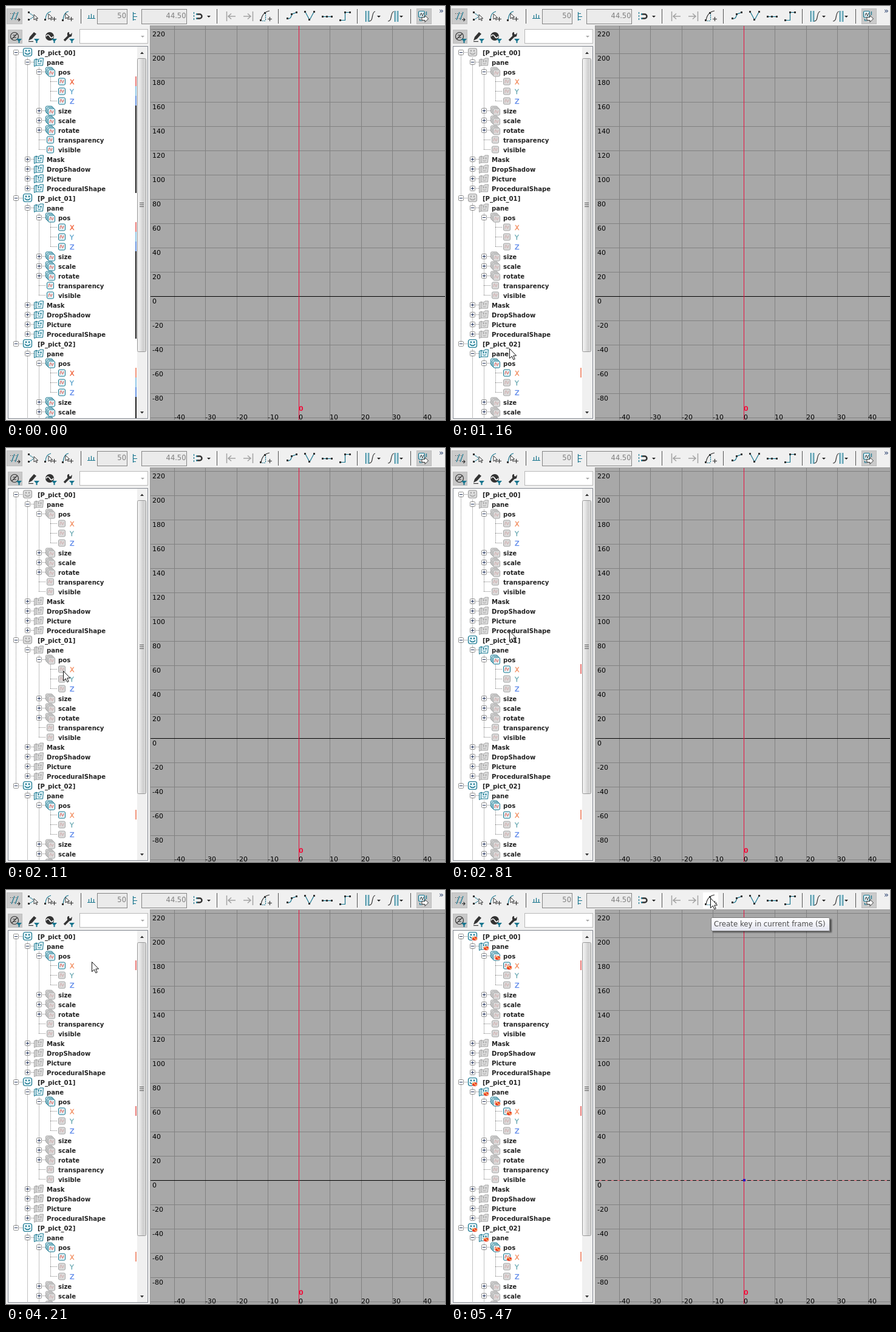
Animation of 723 by 682 pixels, one loop 6.32 s. Source, as an HTML page:

```html
<!DOCTYPE html>
<html lang="en">
<head>
<meta charset="utf-8">
<title>Curve editor</title>
<style>
html, body { margin: 0; width: 100%; height: 100%; overflow: hidden; background: #f0f0f0; }
svg { display: block; font-family: "DejaVu Sans", Verdana, sans-serif; font-size: 11px; }
path, line { fill: none; }
.tree text { font-size: 10.1px; font-weight: bold; fill: #222; }
.tree .X, .tree .Y, .tree .Z { font-size: 11px; font-weight: normal; stroke-width: .4px; }
.tree .X { fill: #f0643c; stroke: #f0643c; }
.tree .Y { fill: #5ca4cc; stroke: #5ca4cc; }
.tree .Z { fill: #5c88ea; stroke: #5c88ea; }
.picked .X { fill: #f28f62; stroke: #f28f62; }
.picked .Y { fill: #6caab4; stroke: #6caab4; }
.icon { --line: #15748c; --fill: #e4f4f9; --curve: #e0483c; stroke: var(--line); fill: var(--fill); }
.icon.off { --line: #a4a4a4; --fill: #dcdcdc; --curve: #cfa6a6; }
.icon .curve { stroke: var(--curve); }
.icon .eye { fill: var(--line); stroke: none; }
.dots { stroke: #858585; stroke-dasharray: 1 1; }
.box { fill: #fff; stroke: #919191; }
.sign { stroke: #22335c; }
.teal { stroke: #17758e; stroke-width: 1.2; }
.dark { stroke: #333; stroke-width: 1.2; }
.pale { stroke: #a2a2a2; stroke-width: 1.5; }
.num { font-size: 11.5px; fill: #808080; text-anchor: end; }
</style>
</head>
<body>
<svg id="stage" width="723" height="682" viewBox="0 0 723 682"></svg>
<script>
const LOOP = 6320, STEP = 78.15;
const stage = document.getElementById('stage');

const rect = (x, y, w, h, fill, more = '') => `<rect x="${x}" y="${y}" width="${w}" height="${h}" fill="${fill}" ${more}/>`;
const path = (d, cls = '', more = '') => `<path d="${d}" class="${cls}" ${more}/>`;
const shape = (d, fill, more = '') => `<path d="${d}" style="fill:${fill}" ${more}/>`;
const text = (x, y, s, more = '') => `<text x="${x}" y="${y}" ${more}>${s}</text>`;
const at = (x, y, s, more = '') => `<g transform="translate(${x} ${y})" ${more}>${s}</g>`;
const range = n => [...Array(n).keys()];

// ---- graph ----
function graph() {
  let s = rect(237, 33, 486, 649, '#a8a8a8') + path('M237.5 33V682M237 32.5H723', '', 'stroke="#989898"');
  let lines = '', labels = '';
  for (const i of range(17)) {
    const y = 38.5 + i * 40;
    lines += `M238 ${y}H723`;
    labels += text(241, y + 11.3, 220 - i * 20);
  }
  for (const i of range(9)) {
    const x = Math.round(277 + i * 51.25);
    lines += `M${x + .5} 33V682`;
    labels += text(x, 681, i * 10 - 40);
  }
  s += path(lines, '', 'stroke="#818181"') + path('M238 478.5H723', '', 'stroke="#000"');
  s += `<g id="curve">${path('M238 478.5H723', '', 'stroke="#e2606e"')}${path('M238 478.5H723', '', 'stroke="#000" stroke-dasharray="6 4"')}</g>`;
  s += path('M482.5 33V682', '', 'stroke="#e8123f"') + labels;
  s += rect(481, 476, 4, 4, '#2a18c8', 'id="key"');
  return s + text(482, 667, '0', 'fill="#f0103c" font-weight="bold"');
}

// ---- toolbar ----
const node = (x, y) => rect(x - 1, y - 1, 3, 3, '#333');
const plus = (x, y) => path(`M${x - 3} ${y}.5h7M${x}.5 ${y - 3}v7`, 'dark');
const caret = (x, y, fill = '#222') => shape(`M${x - 3} ${y}h6l-3 3z`, fill);
const pointer = (x, y) => shape(`M${x} ${y}v9l2.3-2 1.8 3.3 1.4-.8-1.8-3.1h3z`, '#fff', 'stroke="#333"');
const funnel = x => shape(`M${x} 54h9l-3.5 4v3h-2v-3z`, '#17758e');

function toolbar() {
  const pressed = 'stroke="#bdbdbd"';
  let s = rect(0, 0, 723, 32, '#f0f0f0');
  s += rect(1.5, 4.5, 25, 25, '#cacaca', pressed) + rect(676.5, 4.5, 24, 25, '#cacaca', pressed);
  s += rect(415, 4, 25, 26, '#fff', 'id="hover"');
  s += path([123, 347, 448, 578, 666].map(x => `M${x}.5 5V29`).join(''), '', 'stroke="#555"');

  s += path('M7 12.5h10M7 20.5h10', 'dark', 'stroke-dasharray="1 2"') + path('M9 23l5-13M15 23l5-13', 'teal') + path('M18 22.5h5M20.5 20l2.5 2.5-2.5 2.5', 'dark');
  s += path('M38 11l8 6-8 6', 'teal', 'stroke-dasharray="2 1"') + node(37, 10) + node(37, 22) + pointer(46, 14);
  s += path('M65 23Q65 11 74 9', 'teal') + node(64, 22) + pointer(70, 13) + plus(79, 21);
  s += path('M94 24Q95 10 103 9', 'teal') + node(93, 23) + pointer(98, 12) + plus(107, 21);

  s += path('M134 20.5h13M136.5 20v-5M140.5 20v-7M144.5 20v-5', 'teal');
  s += rect(150.5, 5.5, 49, 24, '#ebebeb', 'stroke="#848484"') + text(198, 20, '50', 'class="num"');
  s += path('M209.5 10v14M210 12.5h4M210 17.5h6M210 22.5h4', 'teal');
  s += rect(223.5, 5.5, 74, 24, '#ebebeb', 'stroke="#848484"') + text(296.5, 20, '44.50', 'class="num"');
  s += path('M309.5 10v14', 'teal', 'stroke-dasharray="3 2"');
  s += at(319, 17, path('M-4-3.5h4a3.5 3.5 0 0 1 0 7h-4', '', 'stroke="#333" stroke-width="2.5"') + path('M-6-3.5h2M-6 3.5h2', '', 'stroke="#17758e" stroke-width="2.5"')) + caret(334, 16);

  s += path('M363.5 9v16M366 17h12M371 12.5l-5 4.5 5 4.5', 'pale') + path('M406.5 9v16M391 17h12M398 12.5l5 4.5-5 4.5', 'pale');
  s += path('M420 24Q422 10 434 8', 'dark') + path('M419 24.5h9M427.5 12v12', 'teal', 'stroke-dasharray="2 1"') + node(419, 23) + node(426, 11) + plus(434, 21);

  s += path('M465 21c6 0 4-7 7-8s4-2 7-2', 'teal') + node(463, 20) + node(470, 13) + node(478, 10);
  s += path('M493 10l7 13 7-13', 'teal') + node(492, 9) + node(499, 22) + node(507, 9);
  s += path('M522 17.5h14', 'teal') + node(521, 17) + node(528, 17) + node(536, 17);
  s += path('M551 23.5h7.5v-13h8', 'teal') + node(550, 23) + node(558, 10) + node(566, 10);

  s += rect(592, 8, 5, 18, '#c0dce4') + path('M592.5 8v18M597.5 8v18', 'teal') + path('M598 25c8 0 3-15 10-16', 'dark') + caret(614, 16);
  s += path('M629 25c8 0 3-15 10-16', 'dark') + rect(640, 8, 5, 18, '#c0dce4') + path('M640.5 8v18M645.5 8v18', 'teal') + caret(651, 16);
  s += rect(679.5, 8.5, 10, 10, '#e4f4f9', 'rx="2" class="teal"') + path('M682 16q2-8 3-2t3-3', '', 'stroke="#333"') + path('M692.5 9v6M681.5 21v3h4', 'teal');
  s += shape('M685 18.5h5v-3l5.5 5.5-5.5 5.5v-3h-5z', '#fff', 'stroke="#333"');
  s += text(713, 12, '»', 'font-size="13" fill="#223a6a"');

  s += rect(3.5, 39.5, 23, 22, '#c8c8c8', pressed);
  s += `<circle cx="14" cy="50" r="6.5" fill="none" class="dark"/>` + path('M9.5 54.5l9-9M11 48h6M11 52h6', 'dark') + funnel(17);
  s += shape('M37 57l2-6 7-8 4 3-7 8z', '#333') + path('M37 58.5h8', 'dark') + funnel(46);
  s += `<circle cx="72" cy="50" r="7" fill="#333"/>` + path('M66 50q3-5 6 0t6 0', '', 'stroke="#fff" stroke-width="1.5"') + funnel(75);
  s += path('M96 57l8-8', '', 'stroke="#333" stroke-width="3.5"') + shape('M109 44l-3 3-2-1 0-3q-4 0-3 5t7 2z', '#333') + funnel(104);
  s += rect(121.5, 38.5, 112, 23, '#fff', 'stroke="#b8b8b8"') + caret(225, 49, '#a8a8a8');
  return s;
}

// ---- tree ----
const CURVE = 'M-3 2.5C-2.5-4-.8-4 0-.5S1.8 3.5 3-2.5';
const tile = (x, y) => `<rect x="${x}" y="${y}" width="11" height="11" rx="2"/>`;
const eyes = (a, b, y) => [a, b].map(x => `<rect class="eye" x="${x}" y="${y}" width="2" height="2.5"/>`).join('');
const ICONS = {
  root: '<rect x="-6.5" y="-7" width="14" height="13" rx="3" stroke-width="1.2"/>' + eyes(-3, 2, -4) + path('M-4 .5q4.5 5 9 0', '', 'stroke-width="1.4"'),
  pane: shape('M-7.5-4l4-1.5v10.5l-4 2z', 'var(--fill)') + shape('M-4.5-4.5h5l1.5-2h5.5l-1 12h-11z', 'var(--fill)') + eyes(-1.5, 2.5, -3) + path('M-2 1q3 3.5 6 0'),
  stack: tile(-7.5, -7.5) + tile(-5.5, -5.5) + tile(-3.5, -3.5) + at(2, 2, path(CURVE, 'curve')),
  leaf: tile(-5.5, -5.5) + path(CURVE, 'curve')
};
const BADGE = '<ellipse cx="4" cy="3.5" rx="4.5" ry="3.4" fill="#e63a22" stroke="#fff" stroke-width=".6"/>' + path('M0 3q2-4 4 0t4 0', '', 'stroke="#ffc070" stroke-width="1.4"');

// level, label, icon, sign
const ROWS = [
  [0, '', 'root', '-'], [1, 'pane', 'pane', '-'], [2, 'pos', 'stack', '-'],
  [3, 'X', 'leaf'], [3, 'Y', 'leaf'], [3, 'Z', 'leaf'],
  [2, 'size', 'stack', '+'], [2, 'scale', 'stack', '+'], [2, 'rotate', 'stack', '+'],
  [2, 'transparency', 'leaf'], [2, 'visible', 'leaf'],
  [1, 'Mask', 'pane', '+'], [1, 'DropShadow', 'pane', '+'], [1, 'Picture', 'pane', '+'], [1, 'ProceduralShape', 'pane', '+']
];
const TEXT_X = [52, 67, 86, 105];

function treeRow(k, i) {
  const [level, label, icon, sign] = ROWS[i];
  const y = 77 + 16 * (15 * k + i), x = 16 + 19 * level;
  let s = path(`M${x} ${y - .5}h12`, 'dots');
  if (i === 3) s += rect(103, y - 9, 12, 16, '#cce4f7', `id="press${k}"`);
  if (sign) {
    s += `<rect class="box" x="${x - 3.5}" y="${y - 4.5}" width="8" height="8" rx="1"/>`;
    s += path(`M${x - 2} ${y - .5}h5` + (sign === '+' ? `M${x + .5} ${y - 3}v5` : ''), 'sign');
  }
  s += at(x + 19, y - .5, ICONS[icon], `class="icon" data-k="${k}" data-i="${i}"`);
  if (i < 4) s += at(x + 19, y - .5, BADGE, 'class="badge"');
  return s + text(TEXT_X[level], y + 4, label || `[P_pict_0${k}]`, `class="${label}"`);
}

function tree() {
  let s = rect(0, 33, 237, 649, '#f0f0f0') + rect(3.5, 66.5, 230, 613, '#fff', 'stroke="#828790"');
  let body = path('M16.5 77V557', 'dots');
  for (const k of range(3)) {
    const y = 77 + 240 * k;
    body += path(`M35.5 ${y + 8}V${y + 224}M54.5 ${y + 24}V${y + 160}M73.5 ${y + 40}V${y + 80}`, 'dots');
    body += range(15).map(i => treeRow(k, i)).join('');
    body += rect(213, y + 39, 2, 16, k === 2 ? '#f0957c' : '#ea7c78', `id="bar${k}"`);
    body += `<g class="bars">${rect(213, y + 55, 2, 16, '#92c8e6')}${rect(213, y + 71, 2, 16, '#6a96e2')}${rect(213, y + 87, 2, 144, '#1c1c1c')}</g>`;
  }
  s += `<g class="tree" id="tree" clip-path="url(#view)">${body}</g>`;
  s += rect(216, 67, 17, 612, '#f0f0f0') + rect(216.5, 86.5, 14, 483, 'url(#thumb)', 'rx="2" stroke="#979797"');
  s += path('M220 324.5h7M220 327.5h7M220 330.5h7', '', 'stroke="#555"');
  return s + shape('M221 79h6l-3-3.5z', '#333') + shape('M221 668h6l-3 3.5z', '#333');
}

// ---- tooltip and cursor ----
const tooltip = `<g id="shade" clip-path="url(#rim)">${rect(431, 48, 196, 22, '#000', 'opacity=".5" filter="url(#soft)"')}</g>` +
  `<g id="tip">${rect(428.5, 45.5, 195, 22, 'url(#tipFill)', 'rx="2" stroke="#767676"')}${text(433, 60, 'Create key in current frame (S)', 'font-size="11.8" fill="#4c4c4c"')}</g>`;
const cursor = `<g id="cursor">${shape('M.5.5V16.5L4.3 13 6.8 18.6 9.2 17.6 6.8 12H11.6Z', '#fff', 'stroke="#111"')}</g>`;

const stops = list => list.map((c, i) => `<stop offset="${i / (list.length - 1)}" stop-color="${c}"/>`).join('');
stage.innerHTML = `<defs>
<linearGradient id="thumb">${stops(['#f6f6f6', '#e6e6e6', '#cfcfcf', '#dadada'])}</linearGradient>
<linearGradient id="tipFill" x2="0" y2="1">${stops(['#fff', '#e4e5f0'])}</linearGradient>
<filter id="soft"><feGaussianBlur stdDeviation="1.3"/></filter>
<clipPath id="view"><rect x="4" y="67" width="229" height="612"/></clipPath>
<clipPath id="rim"><path d="M624 40H635V80H420V68H624Z"/></clipPath>
</defs>` + rect(0, 0, 723, 682, '#f0f0f0') + graph() + tree() + toolbar() + tooltip + cursor;

// ---- motion ----
const get = id => document.getElementById(id);
const show = (el, on) => { el.style.display = on ? '' : 'none'; };
const icons = [...document.querySelectorAll('.icon')];
const badges = [...document.querySelectorAll('.badge')];
const bars = [...document.querySelectorAll('.bars')];

const PICK = [48, 31, 13];   // step at which each X row is selected
const PRESS = [46, 29, 99];
const KEYED = 70, TIP = 66;
// step, x, y of the cursor tip
const TRACK = [
  [1, 478, 666], [2, 350, 645], [3, 240, 628], [4, 160, 613], [5, 115, 605], [6, 99, 603],
  [9, 99, 603], [10, 95, 603], [11, 93, 603], [13, 93, 603], [16, 98, 545], [20, 97, 424], [21, 94, 416],
  [24, 94, 385], [27, 94, 367], [35, 94, 367], [36, 96, 301], [38, 88, 210], [40, 82, 150], [42, 91, 126],
  [53, 91, 126], [54, 141, 118], [57, 290, 75], [59, 375, 42], [61, 420, 25], [62, 425, 16], [63, 427, 13]
];

function tipAt(n) {
  const j = TRACK.findIndex(p => p[0] >= n);
  if (j < 0) return TRACK[TRACK.length - 1].slice(1);
  if (j === 0) return TRACK[0].slice(1);
  const [a, ax, ay] = TRACK[j - 1], [b, bx, by] = TRACK[j];
  const u = (n - a) / (b - a);
  return [Math.round(ax + (bx - ax) * u), Math.round(ay + (by - ay) * u)];
}

function draw(time) {
  const n = Math.floor((time % LOOP + 13) / STEP);
  const picked = n >= PICK[2];
  const [x, y] = tipAt(n);
  show(get('cursor'), n > 0);
  get('cursor').setAttribute('transform', `translate(${x} ${y})`);
  get('tree').classList.toggle('picked', picked);
  for (const el of icons) {
    const { k, i } = el.dataset;
    el.classList.toggle('off', picked && !(i < 4 && n >= PICK[k]));
  }
  for (const k of range(3)) {
    show(get('bar' + k), !picked || n >= PICK[k]);
    show(get('press' + k), n >= PRESS[k] && n < PICK[k]);
  }
  bars.forEach(el => show(el, !picked));
  badges.forEach(el => show(el, n >= KEYED));
  show(get('curve'), n >= KEYED);
  show(get('key'), n >= KEYED);
  show(get('hover'), n >= TIP);
  show(get('shade'), n >= TIP);
  show(get('tip'), n >= TIP);
  get('tip').setAttribute('opacity', Math.min(1, .16 + (n - TIP) * .25));
}

const start = performance.now();
function tick() {
  draw(performance.now() - start);
  requestAnimationFrame(tick);
}
tick();
</script>
</body>
</html>
```
